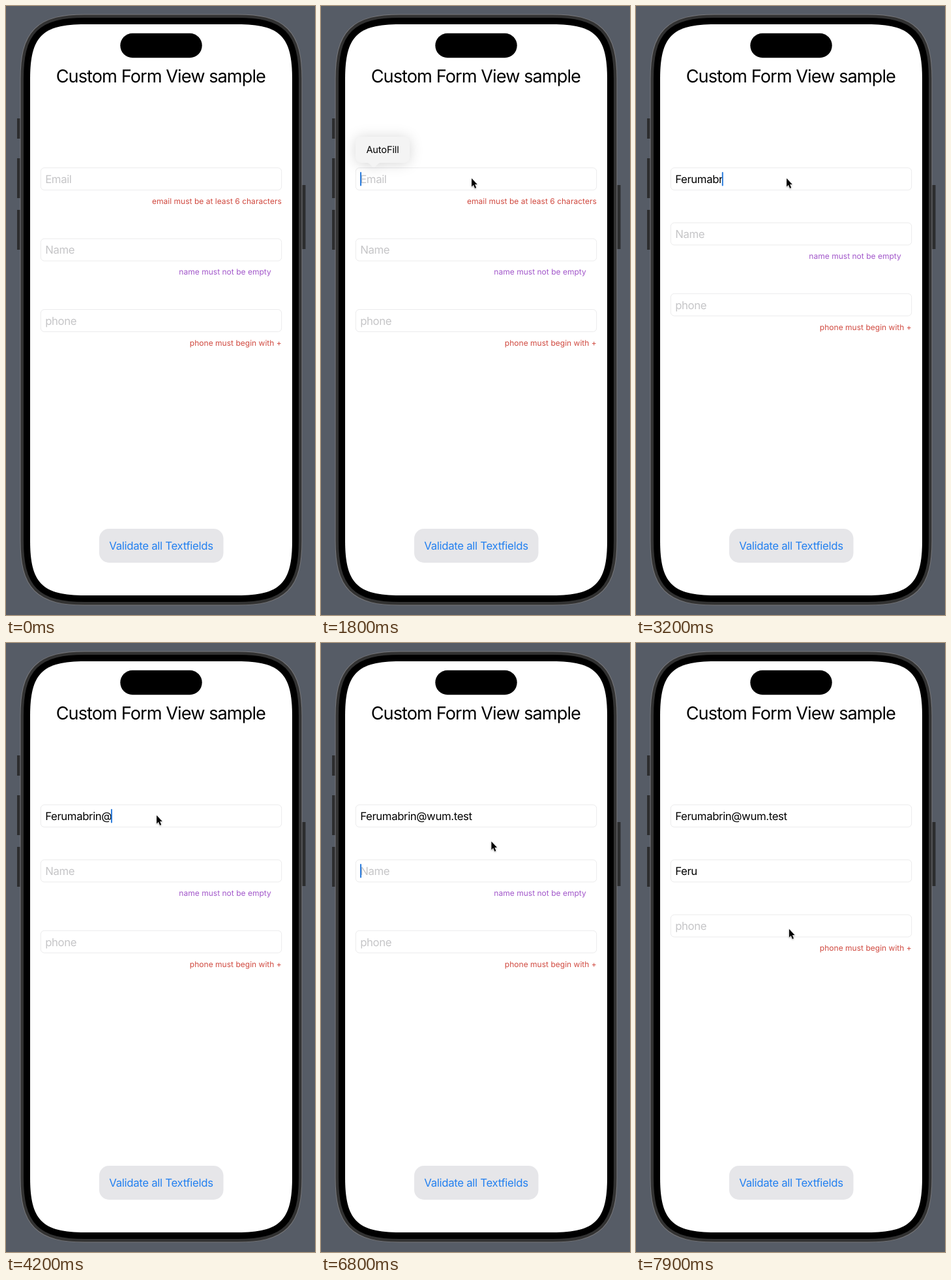
An HTML page that plays this animation: 474 px wide and 932 px high, repeating every 8 s.

```html
<!DOCTYPE html>
<html lang="en">
<head>
<meta charset="utf-8">
<title>Form validation</title>
<style>
  html, body { margin: 0; width: 100%; height: 100%; overflow: hidden; background: #565c66; }
  svg { display: block; }
  text {
    font-family: Inter, "Open Sans", sans-serif;
    font-optical-sizing: none;
    text-rendering: geometricPrecision;
  }
  .title { font-size: 27.2px; letter-spacing: -.95px; text-anchor: middle; }
  .value { font-size: 16.8px; letter-spacing: -.4px; }
  .action { font-size: 16.8px; letter-spacing: -.32px; fill: #2380f0; text-anchor: middle; }
  .error { font-size: 12px; letter-spacing: .02px; text-anchor: end; }
  .bubble { font-size: 14.6px; letter-spacing: -.15px; text-anchor: middle; }
  #popover { filter: drop-shadow(0 1px 10px rgba(0, 0, 0, .16)); }
  #pointer { filter: drop-shadow(0 1px 1px rgba(0, 0, 0, .3)); }
</style>
</head>
<body>
<svg width="474" height="932" viewBox="0 0 474 932">
  <defs>
    <path id="screen" d="M121 28H355C420.5 28 439 46.5 439 112V818C439 883.5 420.5 902 355 902
      H121C55.5 902 37 883.5 37 818V112C37 46.5 55.5 28 121 28Z"/>
  </defs>
  <g fill="#2c2d2e">
    <rect x="17" y="172" width="6" height="31"/>
    <rect x="17" y="233" width="6" height="61"/>
    <rect x="17" y="312" width="6" height="61"/>
    <rect x="453" y="274" width="6.5" height="98"/>
  </g>
  <use href="#screen" stroke="#77777a" stroke-width="31"/>
  <use href="#screen" stroke="#323232" stroke-width="29"/>
  <use href="#screen" stroke="#000" stroke-width="20"/>
  <use href="#screen" fill="#fff"/>
  <rect x="175.3" y="41.8" width="125.4" height="37.4" rx="18.7"/>
  <text class="title" x="237.3" y="116.6">Custom Form View sample</text>
  <g id="fields"></g>
  <rect x="143" y="800" width="190.5" height="52" rx="15" fill="#e6e6e9"/>
  <text class="action" x="238" y="832">Validate all Textfields</text>
  <rect id="caret" y="254" width="2" height="21.5" rx="1" fill="#2a7bdc"/>
  <g id="popover">
    <path fill="#f4f4f4" d="M62 200H127a9 9 0 0 1 9 9V231a9 9 0 0 1-9 9H91
      C87 240 84 247 81 247S75 240 71 240H62a9 9 0 0 1-9-9V209a9 9 0 0 1 9-9Z"/>
    <text class="bubble" x="94.5" y="224.8">AutoFill</text>
  </g>
  <path id="pointer" d="M.6 .8V13.4L3.4 10.8L5.6 15.9L7.6 15L5.5 10H9.2Z"
    stroke="#fff" stroke-width="1" paint-order="stroke" stroke-linejoin="round"/>
</svg>
<script>
const LOOP = 8000, STEP = 100;
const ROW = 108.4, SHIFT = 24.3;          // row pitch, and how far a hidden error lifts the rest
const KEY = 80;                           // ms per typed letter
const BLINK = 500, LIT = 300;             // caret period and its visible part
const EMAIL_FOCUS = 1300, NAME_FOCUS = 6300;
const RED = '#d04a40', PURPLE = '#a257ca';

const $ = id => document.getElementById(id);
const ramp = (t, from, to) => Math.min(1, Math.max(0, (t - from) / (to - from)));

function add(parent, tag, attrs, label = '') {
  const el = document.createElementNS('http://www.w3.org/2000/svg', tag);
  for (const key in attrs) el.setAttribute(key, attrs[key]);
  el.textContent = label;
  return parent.appendChild(el);
}

// Bursts of typing: start time and letters
const emailKeys = [[2100, 'Feru'], [2900, 'mabrin'], [3700, '@'], [4500, 'wum.'], [5100, 'test']];
const nameKeys = [[6820, 'Feru']];

function makeField(hint, error, color, right, min, bursts) {
  const group = add($('fields'), 'g', {});
  add(group, 'rect', { x: 53.3, y: 247.7, width: 369.4, height: 34, rx: 5.5, fill: '#fff', stroke: '#ebebec' });
  const value = add(group, 'text', { class: 'value', x: 60.2, y: 271 });
  const note = add(group, 'text', { class: 'error', x: right, y: 303, fill: color }, error);
  const keys = bursts.flatMap(([at, letters]) => [...letters].map((letter, i) => ({ at: at + i * KEY, letter })));
  return { hint, min, group, value, note, keys };
}

const fields = [
  makeField('Email', 'email must be at least 6 characters', RED, 422.8, 6, emailKeys),
  makeField('Name', 'name must not be empty', PURPLE, 406.8, 1, nameKeys),
  makeField('phone', 'phone must begin with +', RED, 422.8, 1, [])
];

// Pointer moves: start, end, and where the tip arrives
const entry = { x: 370, y: 810 };
const moves = [
  { from: 1000, to: 1300, x: 230.5, y: 263 },
  { from: 5700, to: 6000, x: 262, y: 344 },
  { from: 6100, to: 6400, x: 260.8, y: 303 },
  { from: 7300, to: 7600, x: 242, y: 468 },
  { from: 7600, to: 7800, x: 234.3, y: 437 }
];

function pointerAt(t) {
  return moves.reduce((p, m) => {
    const k = ramp(t, m.from, m.to);
    return { x: p.x + (m.x - p.x) * k, y: p.y + (m.y - p.y) * k };
  }, entry);
}

function draw(t) {
  const [email, name] = fields;
  const active = t < NAME_FOCUS ? email : name;
  const focus = active === email ? EMAIL_FOCUS : NAME_FOCUS;
  let lift = 0;

  fields.forEach((field, i) => {
    const pressed = field.keys.filter(key => key.at <= t);
    const text = pressed.map(key => key.letter).join('');
    const valid = text.length >= field.min, y = i * ROW - lift;
    field.group.setAttribute('transform', `translate(0 ${y})`);
    field.value.textContent = text || field.hint;
    field.value.setAttribute('fill', text ? '#000' : '#c5c5c7');
    field.note.setAttribute('visibility', valid ? 'hidden' : 'visible');
    if (valid) lift += SHIFT;

    if (field === active) {
      const x = text ? 59 + field.value.getComputedTextLength() : 60;
      const idle = t - (text ? pressed.at(-1).at : focus);
      $('caret').setAttribute('transform', `translate(${x} ${y})`);
      $('caret').setAttribute('opacity', idle >= 0 && idle % BLINK < LIT ? 1 : 0);
    }
  });

  $('popover').setAttribute('opacity', ramp(t, 1500, 1800) - ramp(t, 2000, 2400));

  const { x, y } = pointerAt(t);
  $('pointer').setAttribute('visibility', t >= moves[0].from ? 'visible' : 'hidden');
  $('pointer').setAttribute('transform', `translate(${x} ${y})`);
}

const start = performance.now();
function tick() {
  const t = (performance.now() - start) % LOOP;
  draw(Math.floor(t / STEP) * STEP);
  requestAnimationFrame(tick);
}
tick();
</script>
</body>
</html>
```
